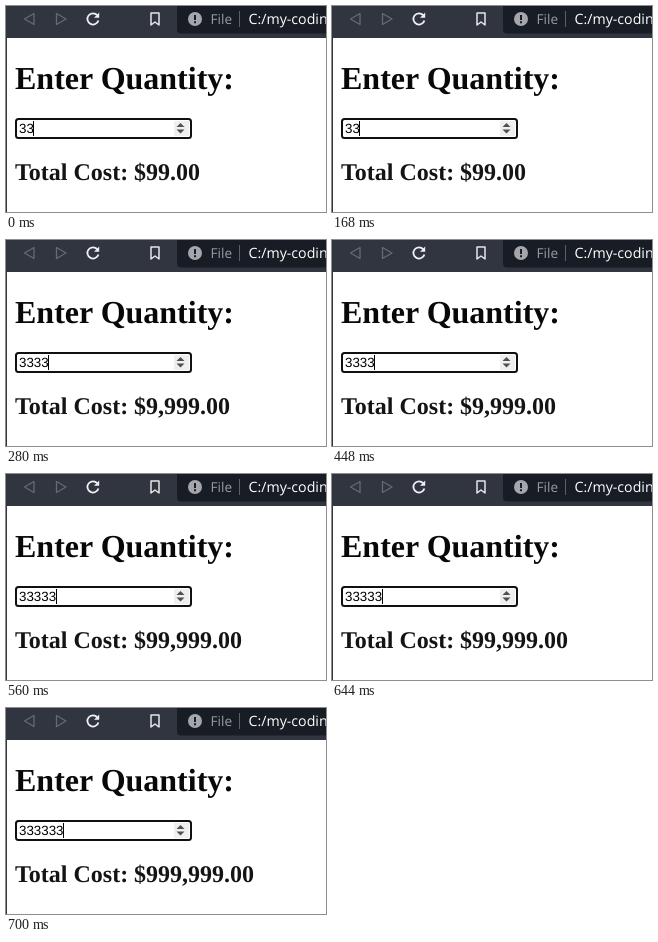
Recreate the animation shown at these times as an HTML page. Size 320 by 206 pixels, loop 0.83 s.

```html
<!DOCTYPE html>
<html lang="en">
<head>
<meta charset="utf-8">
<title>Enter Quantity</title>
<style>
  html, body { margin: 0; width: 100%; height: 100%; overflow: hidden; background: #fff; }
  svg { display: block; text-rendering: geometricPrecision; }
  .page { font: bold 32px "Liberation Serif", "Times New Roman", serif; fill: #080808; }
  .page .cost { font-size: 24px; fill: #141414; }
  .field { font: 13.333px "Liberation Sans", Arial, sans-serif; }
  .bar { font: 13.6px "Open Sans", sans-serif; }
  .bar .path { font-size: 14.2px; fill: #fff; }
  .icon { fill: none; stroke-width: 1.3; stroke-linejoin: round; }
</style>
</head>
<body>
<svg width="320" height="206" viewBox="0 0 320 206">
  <rect width="320" height="32" fill="#31353f"/>
  <rect y="32" width="1" height="174" fill="#31353f"/>
  <rect x="171" y="-10" width="160" height="37.5" rx="4" fill="#181c25"/>

  <g class="icon">
    <path d="M28 7.5V18.5L18.5 13Z" stroke="#666a73"/>
    <path d="M50.5 7.5V18.5L60 13Z" stroke="#666a73"/>
    <path d="M91.2 9.2A5.6 5.6 0 1 0 92.4 14.4" stroke="#f0f0f3" stroke-width="1.8"/>
    <path d="M145 7H153V19L149 16L145 19Z" stroke="#e6e6ea" stroke-width="1.5"/>
  </g>
  <path d="M93.2 6.6V11.8H88Z" fill="#f0f0f3"/>

  <circle cx="189" cy="13" r="7" fill="#a4a6ab"/>
  <path d="M188 9h2v5h-2zM188 15.3h2v2h-2z" fill="#181c25"/>
  <g class="bar">
    <text x="204.5" y="18" fill="#999ca3">File</text>
    <rect x="233" y="5" width="1" height="16" fill="#5c5f68"/>
    <text class="path" x="242.5" y="18">C:/my-coding</text>
  </g>

  <g class="page">
    <text x="9" y="82.6">Enter Quantity:</text>
    <text class="cost" id="cost" x="9" y="174"></text>
  </g>

  <rect x="10" y="113" width="175" height="19" rx="2.5" fill="#fff" stroke="#101010" stroke-width="2"/>
  <text class="field" id="qty" x="13" y="127"></text>
  <rect id="caret" y="115" width="1" height="15"/>
  <rect x="168" y="115" width="15" height="15" fill="#efefef"/>
  <path d="M170.5 121L174.5 117L178.5 121ZM170.5 123.5H178.5L174.5 127.5Z" fill="#505050"/>
</svg>
<script>
  const LOOP = 830, DIGIT = 7.415;
  const [cost, qty, caret] = ['cost', 'qty', 'caret'].map(id => document.getElementById(id));
  const digitsAt = t => t < 280 ? 2 : t < 560 ? 4 : t < 700 ? 5 : 6;
  const start = performance.now();

  function draw(now) {
    const n = digitsAt(Math.max(0, now - start) % LOOP);
    const typed = '3'.repeat(n);
    const total = (typed * 3).toLocaleString('en-US', { minimumFractionDigits: 2 });
    qty.textContent = typed;
    cost.textContent = `Total Cost: $${total}`;
    caret.setAttribute('x', Math.floor(13 + n * DIGIT));
    requestAnimationFrame(draw);
  }
  draw(start);
</script>
</body>
</html>
```
